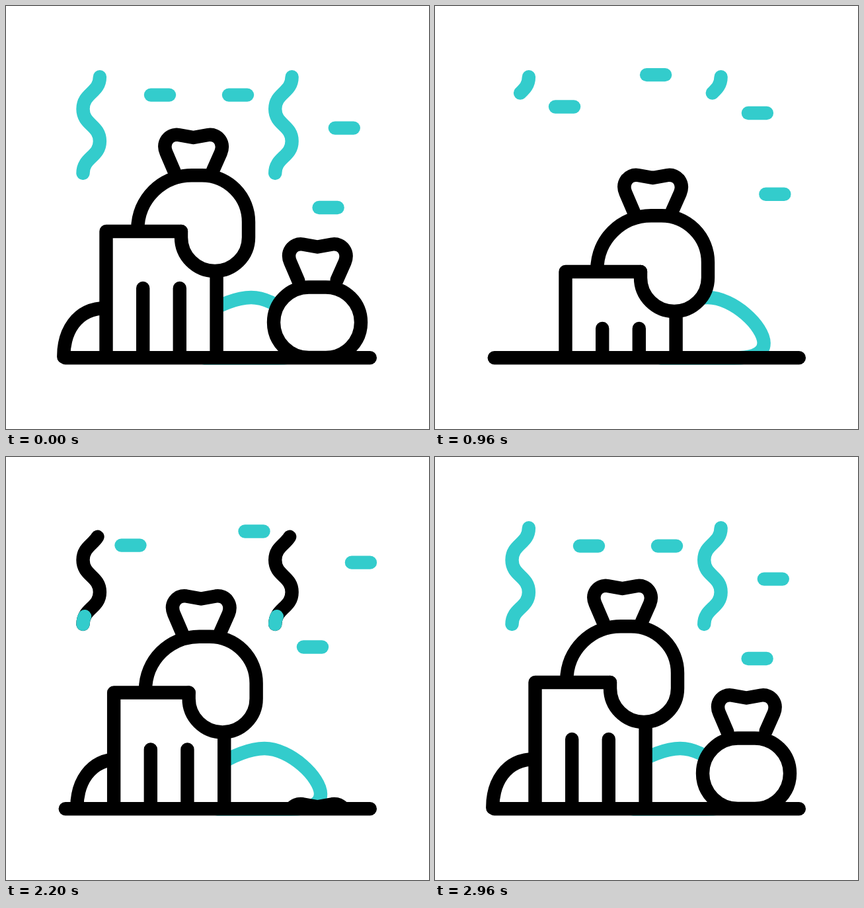
An HTML page for the animation above (3000 ms loop, 640 px wide and 640 px high).

```html
<!DOCTYPE html>
<html lang="en">
<head>
<meta charset="utf-8">
<title>Landfill</title>
<style>
  html, body { margin: 0; width: 100%; height: 100%; overflow: hidden; background: #fff; }
  svg { display: block; width: 100vw; height: 100vh; }
  .ink { stroke: #000; }
  .teal { stroke: #33cccc; }
  .solid { fill: #fff; }
</style>
</head>
<body>
<svg viewBox="0 0 640 640" fill="none" stroke-width="20.4" stroke-linecap="round" stroke-linejoin="round">
  <defs>
    <clipPath id="above"><rect width="640" height="533"/></clipPath>
    <path id="neck" d="M254.5 250 L242.5 222 C236 207 246 193 261 195 L283.5 199 L306 195 C321 193 331 207 325 222 L313 249"/>
    <!-- drawn from the bottom upwards -->
    <path id="wave" pathLength="100" d="M116.5 253 c0 -24.3 25.4 -24.3 25.4 -48.6 s-25.4 -24.3 -25.4 -48.6 s25.4 -24.3 25.4 -48.6"/>
  </defs>

  <g id="darkSteam" class="ink"><use href="#wave"/><use href="#wave" x="290.7"/></g>
  <g id="steam" class="teal"><use href="#wave"/><use href="#wave" x="290.7"/></g>
  <g id="dashes" class="teal"></g>

  <path id="heap" class="teal" d="M300 467 C322 452 350 441 371 441 C410 441 456 485 456 510 C456 528 436 532.5 410 532.5 H300 Z"/>
  <path id="mound" class="ink" d="M87.3 531 C87 495 105 457 152 457"/>

  <g clip-path="url(#above)" class="ink">
    <g id="bag" class="solid">
      <use href="#neck" x="187.7" y="165.5"/>
      <rect x="405" y="425.5" width="132" height="106.5" rx="53.2"/>
    </g>
    <g id="bin">
      <use href="#neck" class="solid"/>
      <path class="solid" stroke="none" d="M151.5 341 H318.5 V560 H151.5 Z"/>
      <path class="solid" d="M199.3 338 C199.3 292 236 256.3 281 256.3 H296.5 A70.5 70.5 0 0 1 367 327 V350 A51 51 0 0 1 265 350 V341"/>
      <path d="M265 341 H151.5 V610 M207.2 427 V610 M262.8 427 V610 M318.6 402 V610"/>
    </g>
  </g>
  <path class="ink" d="M89.8 532.2 H550.8"/>
</svg>
<script>
const LOOP = 3000, STEP = 40;
const $ = id => document.getElementById(id);
const clamp = x => Math.min(1, Math.max(0, x));
const smooth = x => x * x * (3 - 2 * x);

// Cubic bezier easing with control heights 0 and 1
const bezier = (x1, x2) => x => {
  let lo = 0, hi = 1;
  for (let i = 0; i < 24; i++) {
    const s = (lo + hi) / 2, r = 1 - s;
    if (3 * s * r * r * x1 + 3 * s * s * r * x2 + s ** 3 < x) lo = s; else hi = s;
  }
  return smooth(lo);
};

const ramp = (t, from, to, ease = smooth) => ease(clamp((t - from) / (to - from)));
const outAndBack = (t, [a, b, c, d], ease) => ramp(t, a, b) - ramp(t, c, d, ease);

// Slides: distance, then out start, out end, back start, back end
const slides = [
  { el: $('bin'), x: 46, y: 61, times: [80, 840, 1730, 2430] },
  { el: $('bag'), x: 0, y: 195, times: [335, 1035, 2026, 2724] },
  { el: $('mound'), x: 120, y: 0, times: [80, 1000, 1600, 2600], ease: bezier(0.3, 0.35) },
  { el: $('heap'), x: 46, y: 0, times: [580, 1050, 1560, 2738] }
];

// Drifting dashes: three corners of each round trip
const dashTimes = [80, 1080, 2120, 2960];
const dashes = [
  [[233, 134.6], [191, 155], [183.8, 133.5]],
  [[351, 134.6], [331.8, 100], [378.1, 110.1]],
  [[511.8, 184.6], [484.6, 159], [539.6, 157]],
  [[487.6, 305], [518, 282], [461.5, 285.7]]
].map(corners => {
  const el = document.createElementNS('http://www.w3.org/2000/svg', 'path');
  el.setAttribute('d', 'M-14 0 H14');
  $('dashes').append(el);
  return { el, corners };
});

const move = (el, x, y) => el.setAttribute('transform', `translate(${x.toFixed(2)} ${y.toFixed(2)})`);

function trim(el, start, end) {
  const shown = end - start > 0.002;
  el.style.display = shown ? '' : 'none';
  el.style.strokeDasharray = `${(end - start) * 100} 300`;
  el.style.strokeDashoffset = -start * 100;
}

function drift(t, corners) {
  let i = 0;
  while (i < 2 && t >= dashTimes[i + 1]) i++;
  const k = clamp((t - dashTimes[i]) / (dashTimes[i + 1] - dashTimes[i]));
  const a = corners[i], b = corners[(i + 1) % 3];
  return [a[0] + (b[0] - a[0]) * k, a[1] + (b[1] - a[1]) * k];
}

function draw(t) {
  for (const s of slides) {
    const k = outAndBack(t, s.times, s.ease);
    move(s.el, s.x * k, s.y * k);
  }
  for (const d of dashes) move(d.el, ...drift(t, d.corners));

  const regrow = ramp(t, 2091, 2758);
  if (t < 1500) trim($('steam'), ramp(t, 400, 1157), 1);
  else trim($('steam'), 0, regrow);
  trim($('darkSteam'), 0, regrow < 1 ? ramp(t, 1651, 2318) : 0);
}

const begin = performance.now();
function tick() {
  const t = (performance.now() - begin) % LOOP;
  draw(Math.floor((t + 3) / STEP) * STEP % LOOP);
  requestAnimationFrame(tick);
}
tick();
</script>
</body>
</html>
```
